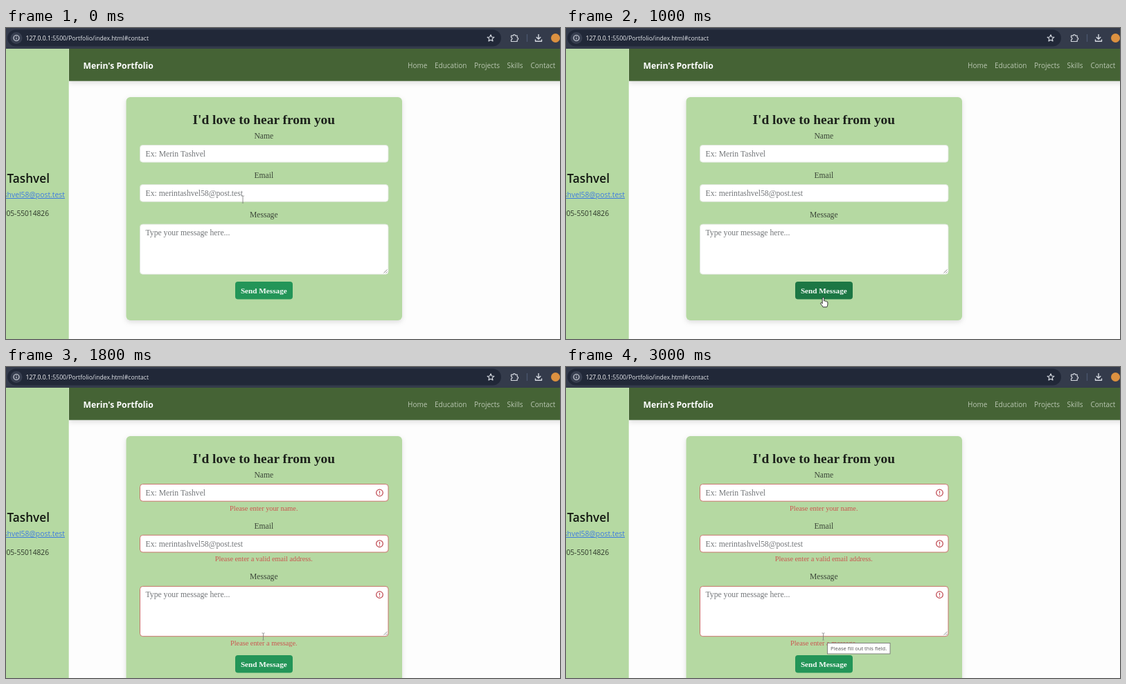
These frames come from a looping animation (800x450 px, 3.1 s). An HTML page:

```html
<!DOCTYPE html>
<html lang="en">
<head>
<meta charset="utf-8">
<title>Contact form</title>
<style>
  html, body { margin: 0; width: 100%; height: 100%; overflow: hidden; background: #fdfdfd; }
  svg { display: block; width: 800px; height: 450px; }
  text { font-family: "Open Sans", "Noto Sans", sans-serif; font-size: 10px; }
  .nav text { fill: #b9c6b1; }
  .form text { font-family: "Liberation Serif", serif; font-size: 11.6px; fill: #3b4538; }
  .form .mid { text-anchor: middle; }
  .form .title { font-size: 19.4px; font-weight: bold; fill: #1c211b; }
  .form .hint { font-size: 11.7px; fill: #74777a; }
  .form .error { font-size: 10.3px; fill: #cb5550; }
  .form .send { font-size: 11.2px; font-weight: bold; fill: #f4fbf6; }
  .field { fill: #fff; stroke-width: .9; }
  .side { text-anchor: end; fill: #2b3528; }
  .icons { fill: none; stroke: #d3d7df; stroke-width: 1.2; stroke-linejoin: round; }
</style>
</head>
<body>
<svg viewBox="0 0 800 450">
  <defs>
    <filter id="soft" x="-20%" y="-20%" width="140%" height="150%">
      <feDropShadow dx="0" dy="2.5" stdDeviation="3.5" flood-opacity=".13"/>
    </filter>
    <g id="alert" fill="none" stroke="#c25058" stroke-width="1.3">
      <circle r="4.8"/>
      <path d="M0-2.8V.8M0 1.7V3"/>
    </g>
  </defs>

  <rect width="800" height="450" fill="#fdfdfd"/>

  <g class="form">
    <rect id="card" x="173.5" y="100" width="398.5" rx="6" fill="#b5d9a2" filter="url(#soft)"/>
    <text class="mid title" x="372.3" y="138.5">I'd love to hear from you</text>

    <text class="mid" x="372.3" y="160">Name</text>
    <rect class="field" x="193.5" y="169.5" width="358.5" height="24.7" rx="4"/>
    <text class="hint" x="201.5" y="186">Ex: Merin Tashvel</text>

    <g id="email">
      <text class="mid" x="372.3" y="217">Email</text>
      <rect class="field" x="193.5" y="226.6" width="358.5" height="24.7" rx="4"/>
      <text class="hint" x="201.5" y="243">Ex: merintashvel58@post.test</text>
    </g>

    <g id="message">
      <text class="mid" x="372.3" y="274">Message</text>
      <rect class="field" x="193.5" y="284" width="358.5" height="72.3" rx="4"/>
      <text class="hint" x="201.5" y="300">Type your message here...</text>
      <path d="M545.5 354.5l5-5M548.5 354.5l2-2" stroke="#777" stroke-width=".8"/>
    </g>

    <g id="errors">
      <use href="#alert" x="539.5" y="182"/>
      <use href="#alert" x="539.5" y="255.7"/>
      <use href="#alert" x="539.5" y="329.5"/>
      <text class="mid error" x="372.3" y="207.5">Please enter your name.</text>
      <text class="mid error" x="372.3" y="281.3">Please enter a valid email address.</text>
      <text class="mid error" x="372.3" y="403">Please enter a message.</text>
    </g>

    <g id="button">
      <rect id="face" x="331" y="367" width="83" height="25.5" rx="4"/>
      <text class="mid send" x="372.3" y="383.7">Send Message</text>
    </g>
  </g>

  <g class="nav">
    <rect x="91" y="30" width="740" height="46.7" fill="#446434" filter="url(#soft)"/>
    <text x="111.5" y="58.8" style="font-size:12.2px;font-weight:bold;fill:#fff">Merin's Portfolio</text>
    <text x="580" y="57.7">Home</text>
    <text x="619" y="57.7">Education</text>
    <text x="676" y="57.7">Projects</text>
    <text x="723.5" y="57.7">Skills</text>
    <text x="757.5" y="57.7">Contact</text>
  </g>

  <rect y="30" width="90.7" height="420" fill="#b5d9a2"/>
  <text class="side" x="63" y="224" style="font-size:17.2px;font-weight:600;fill:#10150f">Tashvel</text>
  <text class="side" x="85" y="245" style="fill:#3d7be0;text-decoration:underline;font-size:10.4px">merintashvel58@post.test</text>
  <text class="side" x="62" y="271.5" style="font-size:10.2px">05-55014826</text>

  <rect width="800" height="30" fill="#343b4b"/>
  <rect x="2" y="2.5" width="713" height="24" rx="12" fill="#212838"/>
  <circle cx="15" cy="14.5" r="8.5" fill="#383f50"/>
  <text x="28.5" y="17.8" style="font-size:8.65px;fill:#e2e5ea"><tspan fill="#fff">127.0.0.1</tspan>:5500/Portfolio/index.html#contact</text>
  <g class="icons">
    <circle cx="15" cy="14.5" r="4"/>
    <path d="M15 14v2.6M15 12v1" stroke-width="1"/>
    <path d="M700 9.8l1.4 3.2 3.5.3-2.7 2.3.8 3.4-3-1.8-3 1.8.8-3.4-2.7-2.3 3.5-.3z"/>
    <path d="M729.5 11.2h2.8a1.6 1.6 0 0 1 3.2 0h2.7v2.9a1.5 1.5 0 0 1 0 3v2.4h-8.7v-2.7a1.5 1.5 0 0 0 0-3z"/>
    <path d="M752.5 9v11" stroke="#4d5870"/>
    <path d="M769 9v7M765.8 13l3.2 3.2 3.2-3.2M764.5 16.5v2.7h9v-2.7" stroke-width="1.4"/>
  </g>
  <circle cx="793.5" cy="14.5" r="6.5" fill="#dc9140"/>

  <g id="tooltip">
    <rect x="377.5" y="399.5" width="90.5" height="15.5" fill="#fff" stroke="#777" stroke-width=".9"/>
    <text x="382" y="410.2" style="font-size:7.6px;fill:#555">Please fill out this field.</text>
  </g>

  <g id="pointer">
    <path id="beam" d="M-2-5h1.4L0-4.4.6-5H2M0-4.4V4.4M-1.2 5H1.2" fill="none" stroke="#777" stroke-width=".8"/>
    <path id="arrow" d="M0 0v11l2.6-2.4 1.7 4 1.7-.7-1.7-3.9h3.5z" fill="#fff" stroke="#222" stroke-width=".8"/>
    <path id="hand" d="M-1.3 1.2Q-1.2 0 0 0T1.2 1.2V5Q2.4 4.3 3.2 5.4 4.3 4.8 5 6 6.4 5.6 6.4 7.2V10Q6.2 12 5.2 13.8H-.4Q-1.6 11.5-3.6 9.2-4.4 7.8-3.2 7.4-2.2 7.4-1.3 8.7z"
      fill="#fff" stroke="#222" stroke-width=".9" stroke-linejoin="round"/>
  </g>
</svg>
<script>
const $ = id => document.getElementById(id);
const fields = document.querySelectorAll(".field");
const LOOP = 3100, STEP = 100, CLICKED = 1100, TOOLTIP = 1900;
const NORMAL = [35, 149, 88], HOVER = [31, 127, 74], ACTIVE = [28, 119, 68];

const ramp = (t, from, to) => Math.min(1, Math.max(0, (t - from) / (to - from)));
const mix = (a, b, k) => a.map((v, i) => v + (b[i] - v) * k);
const rgb = c => `rgb(${c.map(Math.round)})`;
const show = (id, on) => $(id).style.display = on ? "" : "none";
const move = (id, x, y) => $(id).setAttribute("transform", `translate(${x} ${y})`);

function cursorKind(y, invalid) {
  if (invalid || y < 252 || (y > 284 && y < 356)) return "beam";
  return y > 367 ? "hand" : "arrow";
}

function draw(t) {
  const invalid = t >= CLICKED;
  move("email", 0, invalid ? 16.7 : 0);
  move("message", 0, invalid ? 33.4 : 0);
  move("button", 0, invalid ? 50 : 0);
  $("card").setAttribute("height", invalid ? 373 : 323);
  show("errors", invalid);
  show("tooltip", t >= TOOLTIP);

  const border = rgb(mix([222, 230, 220], [200, 104, 98], ramp(t, CLICKED, 1300)));
  fields.forEach(f => f.setAttribute("stroke", border));

  const pressed = mix(mix(NORMAL, HOVER, ramp(t, 300, 500)), ACTIVE, ramp(t, 800, 1000));
  $("face").setAttribute("fill", rgb(mix(pressed, NORMAL, ramp(t, CLICKED, 1300))));

  const k = ramp(t, 0, 500), eased = k * k * (3 - 2 * k);
  const x = 342 + 29.5 * eased, y = 248 + 142 * eased;
  move("pointer", x, y);
  const kind = cursorKind(y, invalid);
  for (const id of ["beam", "arrow", "hand"]) show(id, id === kind);
}

function tick() {
  draw(Math.floor(performance.now() % LOOP / STEP) * STEP);
  requestAnimationFrame(tick);
}
tick();
</script>
</body>
</html>
```
